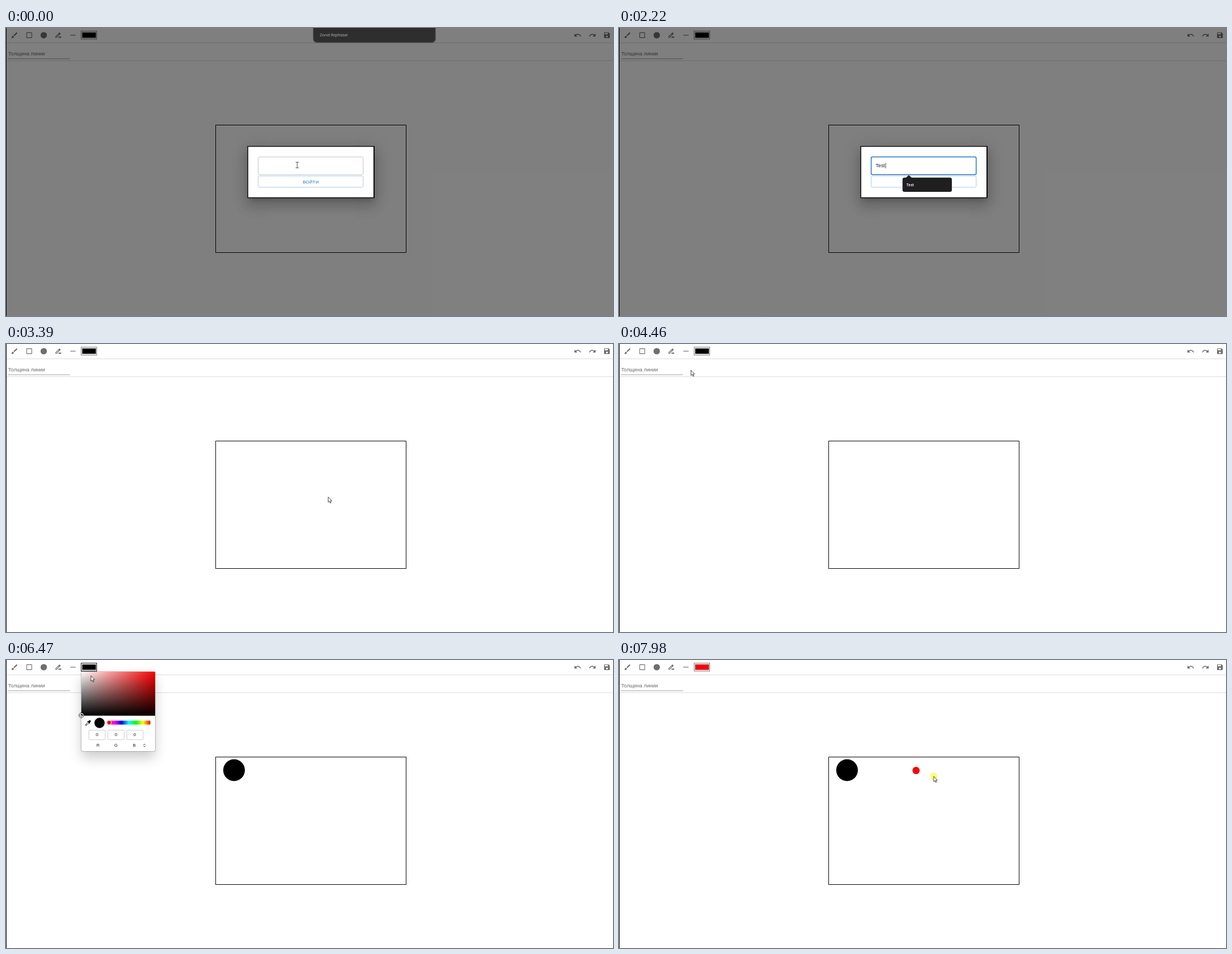
An HTML page for the animation above (8000 ms loop, 1087 px wide and 515 px high).

```html
<!DOCTYPE html>
<html lang="ru">
<head>
<meta charset="utf-8">
<title>Рисование</title>
<style>
@property --r { syntax: "<integer>"; inherits: true; initial-value: 0; }
@property --g { syntax: "<integer>"; inherits: true; initial-value: 0; }
@property --b { syntax: "<integer>"; inherits: true; initial-value: 0; }

html, body { margin: 0; width: 100%; height: 100%; overflow: hidden; background: #fff; }
svg { display: block; width: 1087px; height: 515px; font: 9.13px "Liberation Sans", Arial, sans-serif; }
.icons { fill: #6f6f6f; }
.list { font: 600 6.5px Inter, sans-serif; fill: #fff; }
.list rect, .list path { fill: #1f1f1f; }
.ink { fill: rgb(var(--r) var(--g) var(--b)); }
.shadow { box-sizing: border-box; position: absolute; }
#card { left: 60px; top: 40px; width: 227px; height: 93px; background: #fff; border: 1px solid #000;
  box-shadow: 0 6px 9px -4px rgb(0 0 0 / .2), 0 14px 22px 2px rgb(0 0 0 / .14), 0 5px 26px 5px rgb(0 0 0 / .12); }
#panel { left: 40px; top: 21px; width: 132px; height: 142px; background: #fff; border-radius: 3px;
  box-shadow: 0 0 1px 1px rgb(0 0 0 / .22), 0 12px 22px rgb(0 0 0 / .2); }
.num { position: absolute; top: 125px; box-sizing: border-box; width: 30px; height: 18px; border: 1px solid #cfcfcf;
  border-radius: 2px; text-align: center; font-size: 8px; line-height: 16px; color: #111; }
.num::before { counter-reset: n var(--v); content: counter(n); }

/* timeline: 1% = 80 ms */
svg, .t { animation: 8s step-end infinite; }
svg { animation-name: colour; }
#login { animation-name: login; }
#popup { animation: popup 8s linear infinite; }
#field { animation-name: field; }
#button { animation-name: button; }
#all { animation-name: all; }
#one { animation-name: one; }
#k1 { animation-name: k1; }
#k2 { animation-name: k2; }
#k3 { animation-name: k3; }
#k4 { animation-name: k4; }
#caret { animation-name: caret; }
#picker { animation-name: picker; }
#focus { animation-name: picker; }
#knob { animation-name: knob; }
#black { animation-name: black; }
#red { animation-name: red; }
#cursor { animation: move 8s linear infinite; }
#press { animation-name: press; }
#beam { animation-name: beam; }
#hand { animation-name: hand; }
#arrow { animation-name: arrow; }

@keyframes login { 0% { visibility: visible } 42.375%, 100% { visibility: hidden } }
@keyframes popup { 0%, 9.375% { transform: none } 11.125%, 100% { transform: translateY(-40px) } }
@keyframes field {
  0% { stroke: #c4c4c4; stroke-width: 1px }
  1% { stroke: #212121; stroke-width: 1px }
  10.25% { stroke: #1976d2; stroke-width: 1.5px }
  40.625%, 100% { stroke: #c4c4c4; stroke-width: 1px }
}
@keyframes button {
  0% { stroke: #a9cbec; fill: #fff }
  36.875%, 100% { stroke: #5b9fe0; fill: #f5f9fd }
}
@keyframes all { 0% { visibility: hidden } 11% { visibility: visible } 15.625%, 100% { visibility: hidden } }
@keyframes one { 0% { visibility: hidden } 15.625% { visibility: visible } 28.625%, 100% { visibility: hidden } }
@keyframes k1 { 0% { visibility: hidden } 14.375%, 42.375% { visibility: inherit } }
@keyframes k2 { 0% { visibility: hidden } 16.875%, 42.375% { visibility: inherit } }
@keyframes k3 { 0% { visibility: hidden } 23.5%, 42.375% { visibility: inherit } }
@keyframes k4 { 0% { visibility: hidden } 26.875%, 42.375% { visibility: inherit } }
@keyframes caret {
  0% { visibility: hidden; transform: none }
  10.25% { visibility: visible; transform: none }
  14.375% { visibility: visible; transform: translateX(5.6px) }
  16.875% { visibility: visible; transform: translateX(10.7px) }
  23.5% { visibility: visible; transform: translateX(15.2px) }
  26.875% { visibility: visible; transform: translateX(17.8px) }
  40.625%, 100% { visibility: hidden }
}
@keyframes picker { 0% { visibility: hidden } 79.125% { visibility: visible } 97.125%, 100% { visibility: hidden } }
@keyframes knob {
  0% { transform: translate(135px, 99px) }
  85% { transform: translate(160px, 88px) }
  86.75% { transform: translate(170px, 82px) }
  88.375% { transform: translate(205px, 70px) }
  89.25% { transform: translate(239px, 58.5px) }
  90.125%, 100% { transform: translate(267px, 21px) }
}
@keyframes colour {
  0% { --r: 0; --g: 0; --b: 0 }
  85% { --r: 36; --g: 29; --b: 29 }
  86.75% { --r: 56; --g: 41; --b: 41 }
  88.375% { --r: 94; --g: 44; --b: 44 }
  89.25% { --r: 131; --g: 27; --b: 27 }
  90.125%, 100% { --r: 255; --g: 0; --b: 0 }
}
@keyframes black { 0% { r: 0 } 66.25% { r: 2px } 67.125% { r: 7.8px } 68.125%, 100% { r: 19.4px } }
@keyframes red { 0% { r: 0 } 98.875% { r: 2px } 99.75%, 100% { r: 6.5px } }
@keyframes press {
  0% { visibility: hidden }
  9.375% { visibility: visible } 10.75% { visibility: hidden }
  40.625% { visibility: visible } 42.375% { visibility: hidden }
  57% { visibility: visible } 58.5% { visibility: hidden }
  65.5% { visibility: visible } 69% { visibility: hidden }
  77.5% { visibility: visible } 78.75% { visibility: hidden }
  85% { visibility: visible } 92.5% { visibility: hidden }
  98%, 100% { visibility: visible }
}
@keyframes beam {
  0% { visibility: visible } 14.375% { visibility: hidden }
  33.875% { visibility: visible } 36.875%, 100% { visibility: hidden }
}
@keyframes hand {
  0% { visibility: hidden }
  36.875% { visibility: visible } 42.375% { visibility: hidden }
  56% { visibility: visible } 59.5%, 100% { visibility: hidden }
}
@keyframes arrow {
  0% { visibility: hidden } 42.375% { visibility: visible }
  56% { visibility: hidden } 59.5%, 100% { visibility: visible }
}
@keyframes move {
  0%, .99% { transform: translate(521.5px, 245px) }
  1%, 4% { transform: translate(522px, 241px) }
  7.625%, 9.375% { transform: translate(533px, 235px) }
  11.875%, 33% { transform: translate(552px, 246px) }
  39.125%, 43.875% { transform: translate(577px, 273.5px) }
  45.5% { transform: translate(420px, 100px) }
  47.25%, 49% { transform: translate(222px, 2px) }
  51.625% { transform: translate(355px, 165px) }
  56.875% { transform: translate(68px, 15px) }
  59.5% { transform: translate(70px, 16px) }
  61.5% { transform: translate(446px, 220px) }
  62.75%, 63.75% { transform: translate(407px, 195px) }
  64.5%, 66.25% { transform: translate(408px, 197px) }
  67.125%, 68.875% { transform: translate(418.5px, 206.5px) }
  75.625% { transform: translate(186px, 26px) }
  77.375%, 80% { transform: translate(150px, 13px) }
  84.375% { transform: translate(160px, 88px) }
  85.875% { transform: translate(165px, 85px) }
  89.25%, 90.1% { transform: translate(281.5px, 30.5px) }
  91%, 92.75% { transform: translate(316px, 4px) }
  96.25% { transform: translate(553px, 190px) }
  97.125%, 98% { transform: translate(532px, 197px) }
  99.75%, 100% { transform: translate(563.5px, 208px) }
}
</style>
</head>
<body>
<svg viewBox="0 0 1087 515">
  <defs>
    <linearGradient id="sat"><stop stop-color="#fff"/><stop offset="1" stop-color="#f00"/></linearGradient>
    <linearGradient id="val" x2="0" y2="1"><stop stop-opacity="0"/><stop offset="1"/></linearGradient>
    <linearGradient id="hue">
      <stop stop-color="#f00"/><stop offset=".167" stop-color="#f0f"/><stop offset=".333" stop-color="#00f"/>
      <stop offset=".5" stop-color="#0ff"/><stop offset=".667" stop-color="#0f0"/>
      <stop offset=".833" stop-color="#ff0"/><stop offset="1" stop-color="#f00"/>
    </linearGradient>
  </defs>

  <!-- toolbar -->
  <path d="M1 26.5H1087M1 58.5H1087" stroke="#dcdcdc"/>
  <path d="M4 55H114.5" stroke="#949494" stroke-width=".9"/>
  <text x="4" y="49.4" fill="#6b6b6b">Толщина линии</text>
  <g class="icons">
    <path transform="translate(8.3 6) scale(.571)" d="M7 14c-1.66 0-3 1.34-3 3 0 1.31-1.16 2-2 2 .92 1.22 2.49 2 4 2 2.21 0 4-1.79 4-4 0-1.66-1.34-3-3-3zm13.71-9.37l-1.34-1.34c-.39-.39-1.02-.39-1.41 0L9 12.25 11.75 15l8.96-8.96c.39-.39.39-1.02 0-1.41z"/>
    <rect x="37" y="8.3" width="9.1" height="9.1" rx=".6" fill="none" stroke="#6f6f6f" stroke-width="1.15"/>
    <circle cx="67.6" cy="12.9" r="5.7"/>
    <path transform="translate(86.8 6) scale(.571)" d="M18.41 5.8L17.2 4.59c-.78-.78-2.05-.78-2.83 0L3 15.96V20h4.04L18.41 8.63c.79-.78.79-2.05 0-2.83zM6.21 18H5v-1.21l8.66-8.66 1.21 1.21zM11 20l4-4h6v4z"/>
    <rect x="115.2" y="12.2" width="9.4" height="1.2"/>
    <path id="undo" transform="translate(1016.8 6) scale(.571)" d="M12.5 8c-2.65 0-5.05.99-6.9 2.6L2 7v9h9l-3.62-3.62c1.39-1.16 3.16-1.88 5.12-1.88 3.54 0 6.55 2.31 7.6 5.5l2.37-.78C21.08 11.03 17.15 8 12.5 8z"/>
    <use href="#undo" transform="translate(2073.8 0) scale(-1 1)"/>
    <path transform="translate(1069.3 6) scale(.571)" d="M17 3H5c-1.11 0-2 .9-2 2v14c0 1.1.89 2 2 2h14c1.1 0 2-.9 2-2V7zm-5 16c-1.66 0-3-1.34-3-3s1.34-3 3-3 3 1.34 3 3-1.34 3-3 3zm3-10H5V5h10z"/>
  </g>
  <rect x="134.5" y="5.5" width="28" height="14.5" fill="#efefef" stroke="#8a8a8a"/>
  <rect x="136.5" y="8" width="24.5" height="9.5" class="ink" stroke="#777" stroke-width=".6"/>
  <rect id="focus" class="t" x="134.5" y="5.5" width="28" height="14.5" fill="none" stroke="#222"/>

  <!-- drawing area -->
  <rect x="375.5" y="173.5" width="341" height="228" fill="none" stroke="#000"/>
  <circle id="black" class="t" cx="408.4" cy="197"/>
  <circle id="red" class="t" cx="532" cy="197.6" fill="#f00"/>
  <path d="M.5 0V515" stroke="#000"/>

  <!-- login dialog -->
  <g id="login" class="t">
    <rect width="1087" height="515" fill-opacity=".5"/>
    <foreignObject x="372.5" y="171" width="350" height="210"><div id="card" class="shadow"></div></foreignObject>
    <rect x="433" y="211.7" width="225.8" height="91.8" fill="#fff" stroke="#000" stroke-width="1.4"/>
    <rect id="field" class="t" x="451.6" y="230.6" width="188" height="31.6" rx="2.3" fill="#fff"/>
    <rect id="button" class="t" x="451.6" y="264.6" width="188" height="20.2" rx="2.3"/>
    <text x="545.8" y="277.8" font-size="8" letter-spacing=".23" text-anchor="middle" fill="#1976d2">ВОЙТИ</text>
    <text x="459.5" y="249.3" fill="#222"><tspan id="k1" class="t">T</tspan><tspan id="k2" class="t">e</tspan><tspan id="k3" class="t">s</tspan><tspan id="k4" class="t">t</tspan></text>
    <rect id="caret" class="t" x="459.4" y="241" width=".8" height="10" fill="#222"/>
    <g id="all" class="t list">
      <path d="M513 268.5L519 263L525 268.5z"/>
      <rect x="507.7" y="267.5" width="88.4" height="127" rx="3.5"/>
      <text x="514.5" y="282.6">2</text>
      <text x="514.5" y="303.1">1</text>
      <text x="514.5" y="323.6">5</text>
      <text x="514.5" y="344.1">111</text>
      <text x="514.5" y="364.6">3</text>
      <text x="514.5" y="385.1">333</text>
    </g>
    <g id="one" class="t list">
      <path d="M513 268.5L519 263L525 268.5z"/>
      <rect x="507.7" y="267.5" width="88.4" height="25.5" rx="3.5"/>
      <text x="514.5" y="282.6">Test</text>
    </g>
  </g>

  <g id="popup">
    <rect x="549.5" y="-8" width="220.5" height="35" rx="7" fill-opacity=".18"/>
    <rect x="550.7" y="-8" width="218" height="33.4" rx="6" fill="#2e2e2e" stroke="#3c3c3c" stroke-width=".8"/>
    <path d="M551 .5H768" stroke="#242424"/>
    <text x="562" y="15.3" fill="#a8a8a8" style="font: 6.7px Roboto, sans-serif">Zorvel Rephraser</text>
  </g>

  <!-- colour picker -->
  <g id="picker" class="t">
    <foreignObject x="95" y="0" width="220" height="230">
      <div id="panel" class="shadow"></div>
      <div class="num" style="left:53px;--v:var(--r)"></div>
      <div class="num" style="left:87px;--v:var(--g)"></div>
      <div class="num" style="left:120.5px;--v:var(--b)"></div>
    </foreignObject>
    <rect x="135" y="21" width="132" height="78.5" fill="url(#sat)"/>
    <rect x="135" y="21" width="132" height="78.5" fill="url(#val)"/>
    <g id="knob" class="t" fill="none">
      <circle r="3.5" stroke="#000" stroke-width="2.4"/>
      <circle r="3.3" stroke="#fff" stroke-width="1.2"/>
    </g>
    <g transform="translate(147 112.5) rotate(45)">
      <rect x="-1.8" y="-6" width="3.6" height="4.6" rx="1.6"/>
      <rect x="-2.8" y="-2" width="5.6" height="1.4"/>
      <path d="M-1.2 -.5V4.2L0 6L1.2 4.2V-.5" fill="#fff" stroke="#000" stroke-width=".9"/>
    </g>
    <circle class="ink" cx="167.5" cy="112.5" r="9.2"/>
    <rect x="181" y="108.6" width="77.5" height="6.8" rx="1" fill="url(#hue)"/>
    <circle cx="184.7" cy="112" r="4" fill="#f00" stroke="#fff" stroke-width="1.2"/>
    <g font-size="7.5" text-anchor="middle" fill="#111">
      <text x="164.7" y="155.2">R</text>
      <text x="197" y="155.2">G</text>
      <text x="229.7" y="155.2">B</text>
    </g>
    <path d="M246.2 152L247.8 150.2L249.4 152M246.2 153.6L247.8 155.4L249.4 153.6" fill="none" stroke="#222" stroke-width=".9"/>
  </g>

  <!-- pointer -->
  <g id="cursor">
    <circle id="press" class="t" r="6.7" fill="#ff0" fill-opacity=".55"/>
    <path id="beam" class="t" d="M-2.8 -5H2.8M0 -5V5M-2.8 5H2.8" stroke="#333" stroke-width=".9"/>
    <path id="hand" class="t" d="M-.9 1.4a.9 .9 0 0 1 1.8 0V5l4 .9q1 .3 .9 1.5l-.5 3-.9 2H.6L-3 8.4q-.6-1 .4-1.4 .8-.2 1.7 .8z" fill="#fff" stroke="#111" stroke-width=".8" stroke-linejoin="round"/>
    <path id="arrow" class="t" d="M0 0V9.6L2.2 7.6L3.7 10.9L5.2 10.2L3.8 7H6.6z" fill="#fff" stroke="#111" stroke-width=".8"/>
  </g>
</svg>
</body>
</html>
```
